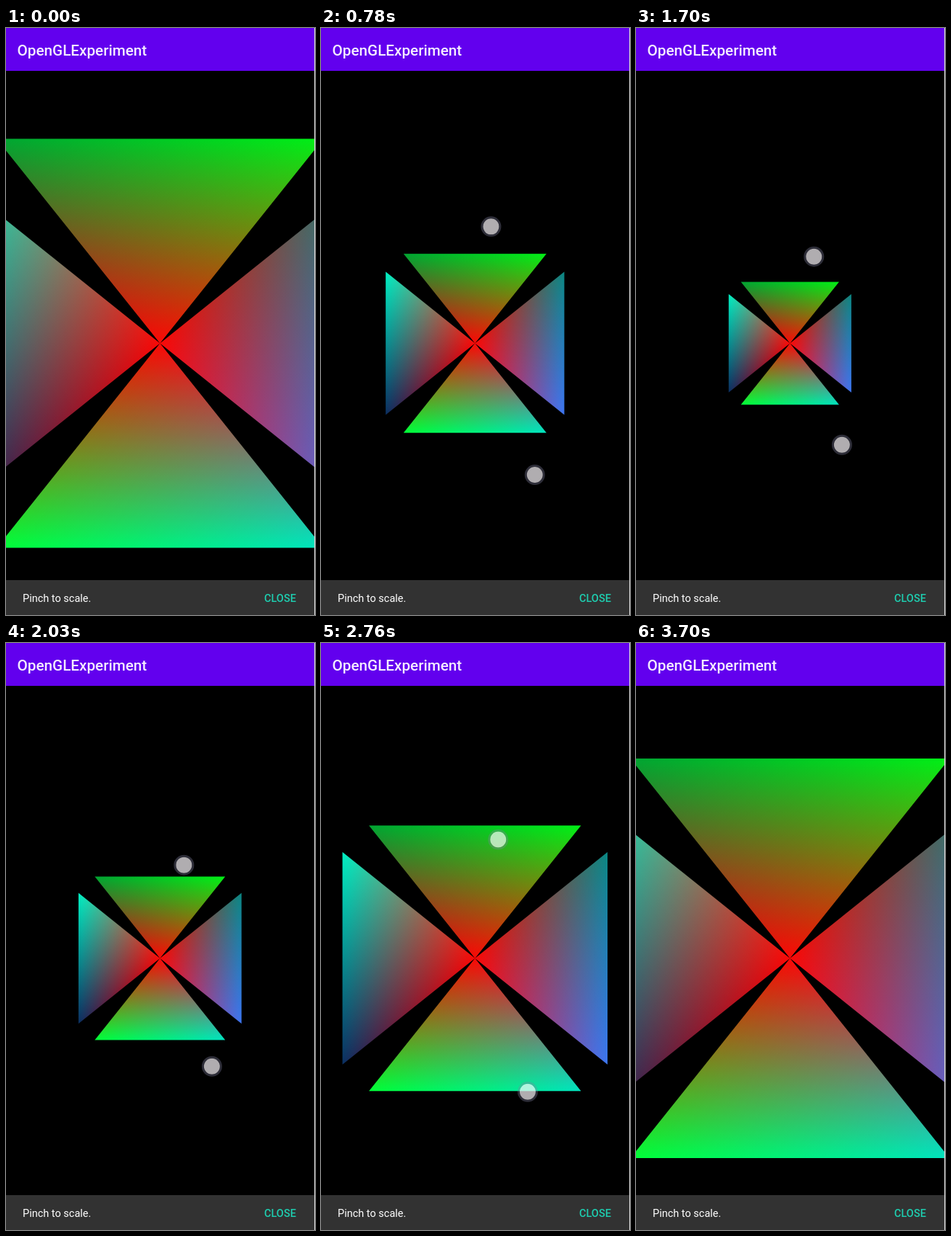
An HTML page with a canvas that plays this animation: 426x808 px, repeating every 3750 ms.

```html
<!DOCTYPE html>
<html lang="en">
<head>
<meta charset="utf-8">
<title>Pinch to scale</title>
<style>
  html, body { margin: 0; overflow: hidden; background: #000; }
  canvas { display: block; }
</style>
</head>
<body>
<canvas id="stage" width="426" height="808"></canvas>
<script>
const ctx = document.getElementById('stage').getContext('2d');
const LOOP = 3750, TAU = 2 * Math.PI;
const CENTER = [212.3, 434], TOUCH_CENTER = [264.6, 444.2];
const TOUCH_START = 250, TOUCH_END = 3600;

// Key points of the pinch: time, half size of the shape, half distance of the touches
const PINCH = [
  [0, 281.5, 230], [550, 268, 224], [1080, 45, 102], [1180, 45, 102],
  [1700, 84.5, 129.5], [2430, 158.5, 149.5], [3040, 206, 194], [3620, 275, 259], [LOOP, 275, 259]
];

// Colours of the outer corners of each side, clockwise from the top
const RED = '#fa0806';
const SIDES = [
  ['#00a532', '#00f016'],
  ['#0a8884', '#3c76f2'],
  ['#00e4c0', '#00ff37'],
  ['#0a3062', '#00f0c3']
];

// Scaling multiplies, so the size is interpolated geometrically
function pinchAt(t) {
  const i = PINCH.findIndex(key => key[0] > t);
  const [t0, size0, reach0] = PINCH[i - 1], [t1, size1, reach1] = PINCH[i];
  const u = (t - t0) / (t1 - t0);
  return { size: size0 * (size1 / size0) ** u, reach: reach0 + (reach1 - reach0) * u };
}

// Adds one vertex's colour, fading to black at the opposite edge
function addVertex([ax, ay, color], [bx, by], [cx, cy]) {
  const ex = cx - bx, ey = cy - by;
  const k = ((ax - bx) * ex + (ay - by) * ey) / (ex * ex + ey * ey);
  const gradient = ctx.createLinearGradient(ax, ay, bx + k * ex, by + k * ey);
  gradient.addColorStop(0, color);
  gradient.addColorStop(1, '#000');
  ctx.fillStyle = gradient;
  ctx.fill();
}

function drawSide([left, right]) {
  const a = [0, 0, RED], b = [-.8, -1, left], c = [.8, -1, right];
  ctx.beginPath();
  for (const [x, y] of [a, b, c]) ctx.lineTo(x, y);
  ctx.closePath();
  addVertex(a, b, c);
  addVertex(b, c, a);
  addVertex(c, a, b);
  ctx.rotate(TAU / 4);
}

function drawShape(size) {
  ctx.save();
  ctx.translate(...CENTER);
  ctx.scale(size, size);
  ctx.globalCompositeOperation = 'lighter';
  SIDES.forEach(drawSide);
  ctx.restore();
}

function drawTouch(x, y) {
  ctx.beginPath();
  ctx.arc(x, y, 11, 0, TAU);
  ctx.fillStyle = 'rgba(255,250,255,.69)';
  ctx.fill();
  ctx.beginPath();
  ctx.arc(x, y, 12.5, 0, TAU);
  ctx.lineWidth = 3;
  ctx.strokeStyle = 'rgba(130,130,160,.35)';
  ctx.stroke();
}

function rect(color, x, y, w, h) {
  ctx.fillStyle = color;
  ctx.fillRect(x, y, w, h);
}

function label(text, x, y, size, weight, color) {
  ctx.font = `${weight} ${size}px Roboto, sans-serif`;
  ctx.fillStyle = color;
  ctx.fillText(text, x, y);
}

function frame(now) {
  const t = now % LOOP;
  const { size, reach } = pinchAt(t);
  rect('#000', 0, 0, 426, 808);
  drawShape(size);

  rect('#6200ee', 0, 0, 426, 59);
  label('OpenGLExperiment', 15.5, 37.5, 20.7, 500, '#f4ecff');
  rect('#323232', 0, 760, 426, 48);
  label('Pinch to scale.', 23, 790, 14.5, 400, '#fff');
  label('CLOSE', 356, 790, 14.5, 500, '#1eceb0');
  rect('#d8d8d8', 425, 0, 1, 808);

  if (t >= TOUCH_START && t < TOUCH_END) {
    const [x, y] = TOUCH_CENTER;
    const tilt = reach * (.2 - .03 * t / 1000); // the hand turns slowly upright
    drawTouch(x - tilt, y - reach);
    drawTouch(x + tilt, y + reach);
  }
  requestAnimationFrame(frame);
}
requestAnimationFrame(frame);
</script>
</body>
</html>
```
